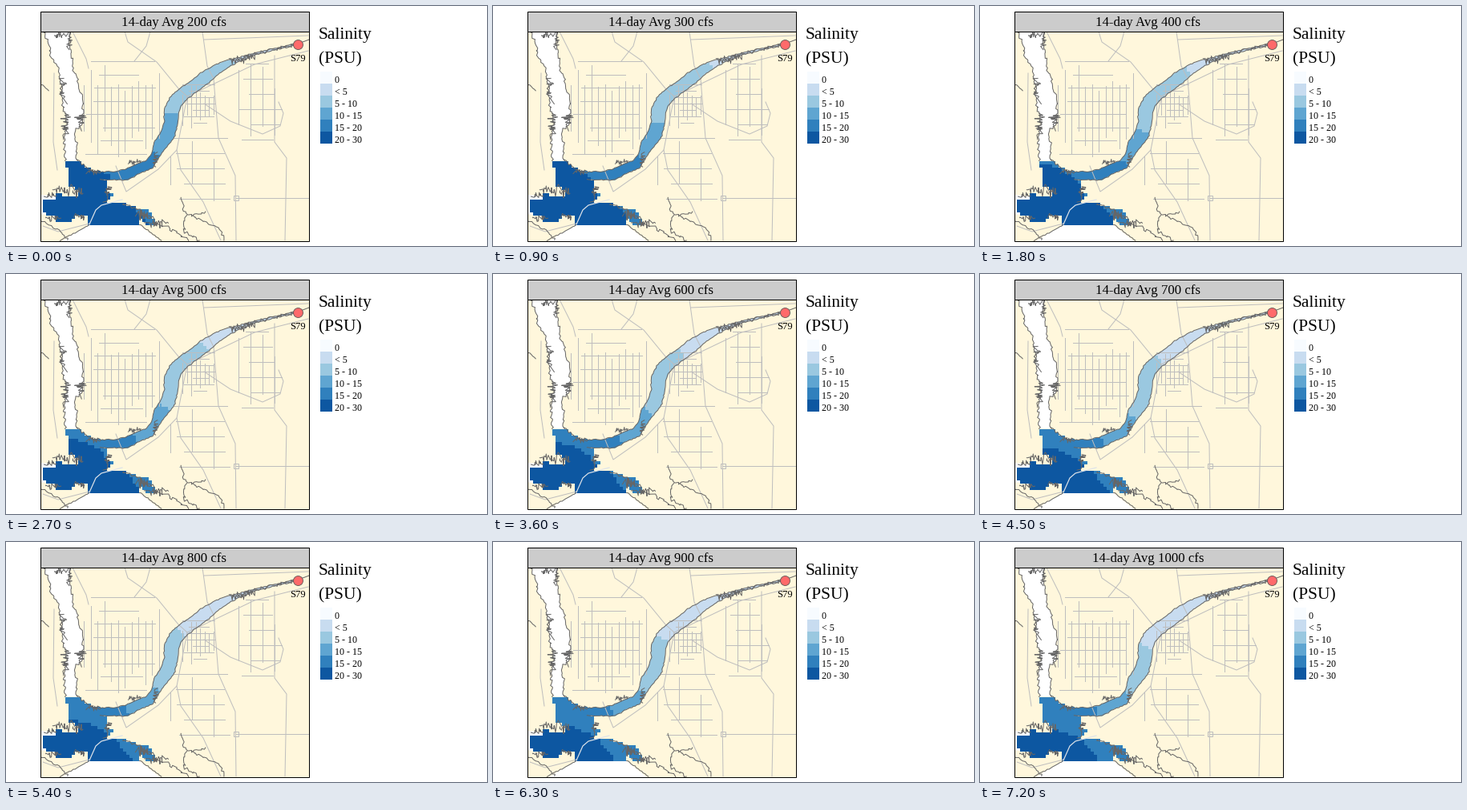
A matplotlib script for the animation above (8000 ms loop, 600 by 300 pixels).

```python
import numpy as np
import matplotlib.pyplot as plt
from matplotlib.animation import FuncAnimation
from matplotlib.colors import ListedColormap
from matplotlib.patches import Circle, Polygon, Rectangle
from matplotlib.path import Path

W, H, DPI = 600, 300, 100
PX = 72 / DPI
INTERVAL, FRAMES, HOLD = 100, 80, 9
LAND, ROAD, COAST, GREY = "#FFF7DC", "#BEBEBE", "#666666", "#CCCCCC"
BLUES = ["#F7FBFF", "#C8DCF0", "#9AC8E0", "#5FA5D1", "#3080BD", "#0D57A1"]
LABELS = ["0", "< 5", "5 - 10", "10 - 15", "15 - 20", "20 - 30"]

plt.rcParams["font.family"] = "Liberation Serif"
rng = np.random.default_rng(7)
fig = plt.figure(figsize=(W / DPI, H / DPI), dpi=DPI, facecolor="white")
ax = fig.add_axes([0, 0, 1, 1])
ax.axis("off")
panel = Rectangle((42.5, 31.5), 335, 262, fc=LAND, ec="none", zorder=0)
ax.add_patch(panel)


def line(pts, color=ROAD, width=1.0, z=4):
    x, y = np.array(pts, float).T
    art, = ax.plot(x, y, color=color, lw=width * PX, zorder=z)
    art.set_clip_path(panel)


def area(pts, color="white", z=1):
    art = Polygon(pts, fc=color, ec="none", zorder=z)
    ax.add_patch(art)
    art.set_clip_path(panel)


def resample(pts, step):
    """Even steps along a polyline, keeping any extra columns."""
    pts = np.array(pts, float)
    legs = np.hypot(*np.diff(pts[:, :2], axis=0).T)
    dist = np.r_[0, np.cumsum(legs)]
    d = np.linspace(0, dist[-1], int(dist[-1] / step) + 1)
    return np.column_stack([np.interp(d, dist, col) for col in pts.T])


def ragged(pts, amp, step=2.5):
    out = resample(pts, step)
    return out + rng.uniform(-amp, amp, out.shape)


def shore(amp, *pts):
    line(ragged(pts, amp), COAST, z=5)


def scribble(x, y, w, h):
    """A tangle of short shore lines around one spot."""
    n = int(w + h)
    pts = np.c_[rng.normal(x, w / 3, n), rng.normal(y, h / 3, n)]
    line(pts[np.argsort(pts[:, 0 if w > h else 1])], COAST, z=5)


# Western channel: centre and half width
channel = [(63, 32, 16), (66, 45, 13), (69, 62, 13), (75, 80, 9),
           (80, 98, 11), (82, 115, 13), (84, 130, 12), (86, 146, 9),
           (79, 158, 6), (81, 174, 8), (81, 194, 7)]
x, y, half = resample(channel, 2.5).T
sides = [np.c_[x + s * half, y] + rng.uniform(-1.6, 1.6, (len(x), 2)) for s in (-1, 1)]
area(np.r_[sides[0], sides[1][::-1]])
for side in sides:
    line(side, COAST, z=5)
area([(70, 294), (85, 284), (103, 274), (166, 273), (192, 294)])
area([(43, 236), (62, 238), (62, 263), (43, 260)])

# River from bay to gauge: centre and half width
river = np.array([
    (118, 212, 5), (135, 212, 5), (150, 211, 7), (165, 203, 6), (179, 198, 6),
    (186, 187, 5), (192, 174, 8), (202, 160, 9), (206, 145, 8.5), (206, 132, 9),
    (212, 119, 9), (222, 109, 8), (235, 100, 7.5), (248, 90, 8), (261, 80, 6),
    (275, 73, 4.5), (290, 67, 2.5), (310, 60, 1.5), (340, 53, 1), (362, 48, 1)])
t = np.arange(0, len(river) - 0.95, 0.05)
track = np.column_stack([np.interp(t, np.arange(len(river)), c) for c in river.T])
mid, half = track[:, :2], track[:, 2:]
smooth = np.ones(15) / 15
slope = np.gradient(mid, axis=0)
slope = np.column_stack([np.convolve(np.pad(c, 7, mode="edge"), smooth, "valid")
                         for c in slope.T])
normal = np.c_[slope[:, 1], -slope[:, 0]] / np.hypot(*slope.T)[:, None]
banks = [mid + s * half * normal for s in (1, -1)]

bay = [(73, 193), (88, 193), (106, 205), (118, 207), (127, 222), (125, 230),
       (133, 236), (131, 242), (122, 245), (145, 247), (160, 252), (166, 262),
       (166, 274), (104, 274), (103, 262), (88, 261), (82, 270), (62, 270),
       (60, 262), (50, 262), (46, 253), (46, 240), (62, 240), (64, 235),
       (86, 238), (92, 233), (80, 225), (78, 206)]
inlet = [(162, 252), (173, 253), (181, 260), (186, 272), (176, 272), (165, 262)]

# Model grid
CELL = 4
X0, X1, Y0, Y1 = 42, 378, 34, 274
gx, gy = np.meshgrid(np.arange(X0, X1, CELL) + CELL / 2,
                     np.arange(Y0, Y1, CELL) + CELL / 2)
cells = np.c_[gx.ravel(), gy.ravel()]
gap = ((cells[:, None] - mid[None]) ** 2).sum(axis=2)
reach = t[gap.argmin(axis=1)].reshape(gx.shape)
in_bay = np.any([Path(p).contains_points(cells) for p in (bay, inlet)],
                axis=0).reshape(gx.shape)

# Class limits along the river, and the salt front in the bay, by flow
FLOWS = [200, 400, 500, 700, 900, 1000]
LIMITS = [[5.2, 4.2, 2.8, 2.2, 1.9, 1.6],
          [8.9, 7.2, 6.6, 5.7, 5.0, 4.7],
          [15.6, 13.9, 13.0, 11.2, 9.9, 9.2],
          [20, 20, 20, 20, 19, 18]]
BAY_FLOWS = [200, 500, 1000]
FRONT = {75: [180, 204, 234], 100: [190, 210, 236],
         118: [206, 221, 243], 132: [214, 240, 249]}
EAST_EDGE = [167, 160, 138]


def salinity(flow):
    level = 4 - sum((reach > np.interp(flow, FLOWS, row)).astype(int) for row in LIMITS)
    front = np.interp(gx, list(FRONT),
                      [np.interp(flow, BAY_FLOWS, row) for row in FRONT.values()])
    edge = np.interp(flow, BAY_FLOWS, EAST_EDGE) + 0.8 * (gy - 260)
    salty = (gy > front) & (gx < edge) & ((gx < 132) | (gy > 244))
    return np.where(salty, 5, np.where(in_bay, 4, level))


def layer(z):
    return ax.imshow(np.zeros(gx.shape), cmap=ListedColormap(BLUES), vmin=-0.5,
                     vmax=5.5, extent=(X0, X1, Y1, Y0), aspect="auto",
                     interpolation="nearest", zorder=z)


bay_img, river_img = layer(2), layer(3)
river_img.set_clip_path(Path(np.r_[banks[0], banks[1][::-1]]), ax.transData)


def street_grid(x0, x1, y0, y1, dx, dy):
    """Streets on a lattice, each one trimmed a little at its ends."""
    trim = lambda a, b: np.sort(rng.uniform([a, b - (b - a) / 3], [a + (b - a) / 3, b]))
    for y in np.arange(y0, y1 + 1, dy):
        a, b = trim(x0, x1)
        line([(a, y), (b, y)])
    for x in np.arange(x0, x1 + 1, dx):
        a, b = trim(y0, y1)
        line([(x, a), (x, b)])


street_grid(97, 190, 69, 188, 8.5, 16.5)
street_grid(220, 262, 98, 152, 5.5, 8)
street_grid(290, 344, 72, 180, 15, 19)
street_grid(205, 285, 165, 245, 27, 19)

# Main roads
line([(148, 32), (152, 45), (188, 70), (215, 103), (226, 113), (213, 180),
      (218, 205), (246, 245), (268, 293)])
line([(245, 32), (251, 75), (259, 91), (265, 165), (286, 212), (287, 293)])
line([(83, 32), (100, 66), (103, 78)])
line([(226, 113), (262, 96), (310, 73), (377, 56)])
line([(247, 122), (280, 144), (320, 160), (342, 150), (346, 134), (340, 120)])
line([(213, 180), (190, 204), (150, 232), (137, 200)])
line([(335, 62), (335, 170), (350, 190), (348, 293)])
line([(287, 240), (377, 240)])
line([(160, 69), (175, 50), (180, 32)])
line([(247, 42), (377, 37)])
line([(60, 84), (59, 170), (64, 205)])
line([(46, 275), (65, 282), (104, 272)])
ax.add_patch(Rectangle((283.5, 236.5), 6, 6, fc="none", ec=ROAD, lw=PX, zorder=4))
line([(104, 273), (112, 255), (119, 249), (145, 242)], "#DDE3EA", 1.2)

# Shores
for bank in banks:
    line(ragged(bank, 0.7), COAST, z=5)
shore(2, *river[-4:, :2])
line([(362, 48), (378, 42)], COAST, z=5)
shore(1.4, (88, 193), (106, 205), (118, 208))
shore(1.2, (43, 268), (68, 282), (78, 293))
shore(0.8, (104, 274), (68, 293))
shore(2.4, (145, 247), (170, 257), (190, 272), (216, 284), (226, 293))
shore(0.8, (166, 273), (194, 293))
shore(1.5, (218, 238), (222, 256), (232, 262), (250, 257))
shore(1.8, (224, 262), (222, 282), (241, 293))
shore(1.3, (232, 262), (268, 280), (272, 293))
shore(1.6, (43, 97), (54, 107))
for spot in [(66, 36, 13, 7), (79, 42, 6, 14), (71, 105, 8, 20), (74, 148, 7, 24),
             (93, 142, 8, 16), (68, 230, 20, 8), (88, 233, 12, 9), (128, 232, 9, 18),
             (110, 208, 14, 6), (57, 237, 14, 5), (58, 265, 14, 6), (93, 264, 12, 6),
             (171, 261, 14, 13), (188, 271, 20, 9), (186, 193, 6, 16),
             (160, 195, 14, 5), (289, 68, 18, 7), (304, 63, 13, 7)]:
    scribble(*spot)

# Title strip, frame, gauge and legend
for top, height, fill in [(6.5, 25, GREY), (31.5, 262, "none")]:
    ax.add_patch(Rectangle((42.5, top), 335, height, fc=fill, ec="black", lw=PX, zorder=7))
ax.add_patch(Circle((364.5, 48.5), 6, fc="#FF6A6A", ec="#555555", lw=0.8 * PX, zorder=8))


def label(x, y, text, size, ha="left"):
    return ax.text(x, y, text, fontsize=size * PX, ha=ha, va="baseline", zorder=9)


label(364, 69, "S79", 12.5, "center")
title = label(210, 25, "", 16.8, "center")
label(390, 41, "Salinity", 21.5)
label(390, 71, "(PSU)", 21.5)
for i, (color, text) in enumerate(zip(BLUES, LABELS)):
    ax.add_patch(Rectangle((392, 82 + 15 * i), 15, 15, fc=color, ec="none"))
    label(410, 96 + 15 * i, text, 12)

ax.set_xlim(0, W)
ax.set_ylim(H, 0)


def update(i):
    flow = 200 + 100 * min(i // HOLD, 8)
    level = salinity(flow)
    river_img.set_data(level)
    bay_img.set_data(np.ma.masked_where(~in_bay, level))
    title.set_text(f"14-day Avg {flow} cfs")
    return river_img, bay_img, title


anim = FuncAnimation(fig, update, frames=FRAMES, interval=INTERVAL,
                     init_func=lambda: update(0), repeat=True, repeat_delay=0)
plt.show()
```
